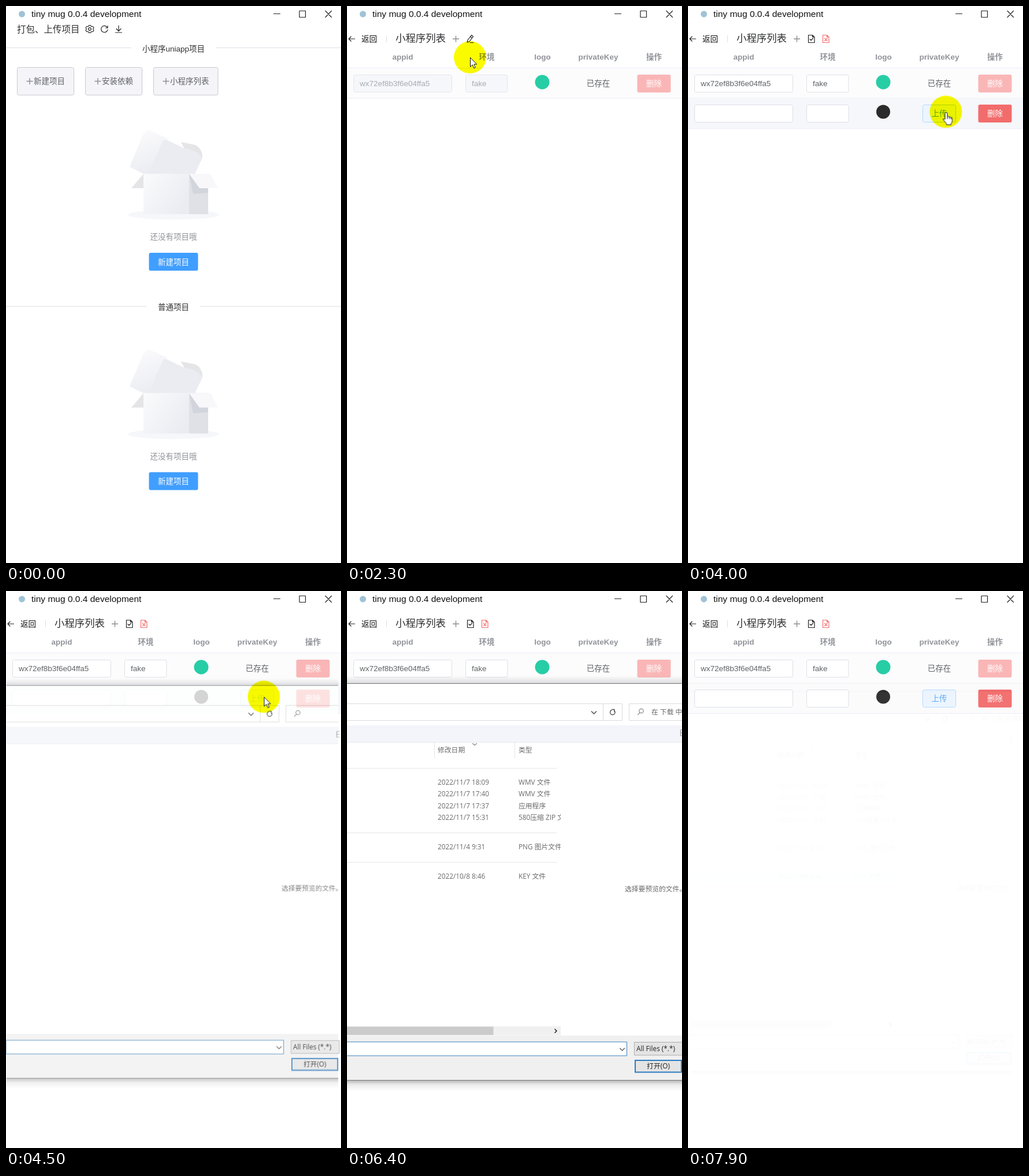
These frames come from a looping animation (580x966 px, 8 s). An HTML page:

```html
<!DOCTYPE html>
<html lang="zh-CN">
<head>
<meta charset="utf-8">
<title>Project list</title>
<style>
html, body { margin: 0; width: 100%; height: 100%; overflow: hidden; background: #fff; }
svg { display: block; width: 580px; height: 966px; }
text { font: 13.5px "Liberation Sans", "Noto Sans CJK SC", "Noto Sans CJK", sans-serif; fill: #303133; white-space: pre; }
.mid { text-anchor: middle; }
.end { text-anchor: end; }
.white { fill: #fff; }
.soft { fill: #909399; }
.body { fill: #606266; }
.head text { font-weight: bold; fill: #909399; text-anchor: middle; }
.line { stroke: #dcdfe6; fill: none; }
.icon { fill: none; stroke: #222; stroke-width: 1.2; stroke-linecap: round; stroke-linejoin: round; }
.plain { fill: #f4f4f9; stroke: #c8cad0; }
.field { fill: #fff; stroke: #dcdfe6; }
.off .field { fill: #f5f7fa; stroke: #e4e7ed; }
.off text { fill: #a8abb2; }
#dialog text { font: 11.8px "Open Sans", "Noto Sans CJK SC", "Noto Sans CJK", sans-serif; fill: #6a6a6a; }
#dialog text.dark { fill: #222; }
.grid { stroke: #e6e6e6; fill: none; }

.anim, .move { animation: 8s step-end infinite; }
#home { animation-name: home; }
#list { animation-name: list; }
#press { animation-name: press; }
#view { animation-name: view; }
#edit { animation-name: edit; }
#hover1 { animation-name: hover1; }
#hover2 { animation-name: hover2; }
#dialog { animation-name: dialog; transform-origin: 100px 490px; }
#files { animation-name: files; }
#loads { animation-name: loads; }
#pick { animation-name: pick; }
#arrow { animation-name: arrow; }
#hand { animation-name: hand; }
#ring { animation-name: ring; }
.move { animation-name: move; }
#spot { fill: #fbfb00; mix-blend-mode: multiply; }

@keyframes home { 0% { opacity: 1 } 16.25%, 100% { opacity: 0 } }
@keyframes list { 0% { opacity: 0 } 16.25%, 100% { opacity: 1 } }
@keyframes press { 0% { opacity: 0 } 12.5% { opacity: 1 } 16.25%, 100% { opacity: 0 } }
@keyframes view { 0% { opacity: 1 } 33.75%, 100% { opacity: 0 } }
@keyframes edit { 0% { opacity: 0 } 33.75%, 100% { opacity: 1 } }
@keyframes hover1 { 0% { opacity: 0 } 41.25% { opacity: 1 } 46.25%, 100% { opacity: 0 } }
@keyframes hover2 { 0% { opacity: 0 } 46.25% { opacity: 1 } 57.5%, 100% { opacity: 0 } }
@keyframes dialog {
  0% { opacity: 0; transform: scale(.94) }
  55% { opacity: .35; transform: scale(.96) }
  56.25% { opacity: .8; transform: scale(.99) }
  57.5% { opacity: 1; transform: none }
  96.25% { opacity: .6; transform: scale(.985) }
  97.5% { opacity: .2; transform: scale(.97) }
  98.75% { opacity: .04; transform: scale(.958) }
  100% { opacity: 0; transform: scale(.94) }
}
@keyframes files { 0% { opacity: 0 } 57.5% { opacity: 1 } 78.75%, 100% { opacity: 0 } }
@keyframes loads { 0% { opacity: 0 } 78.75%, 100% { opacity: 1 } }
@keyframes pick {
  0% { opacity: 0; transform: none }
  87.5% { opacity: 1; transform: translateY(-51px) }
  88.75% { opacity: 1; transform: none }
  91.25%, 100% { opacity: 1; transform: translateY(51px) }
}
@keyframes hand {
  0% { opacity: 0 } 11.25% { opacity: 1 } 16.25% { opacity: 0 }
  32.5% { opacity: 1 } 37.5% { opacity: 0 } 47.5% { opacity: 1 } 56.25%, 100% { opacity: 0 }
}
@keyframes arrow {
  0% { opacity: 1 } 11.25% { opacity: 0 } 16.25% { opacity: 1 }
  32.5% { opacity: 0 } 37.5% { opacity: 1 } 47.5% { opacity: 0 } 56.25%, 100% { opacity: 1 }
}
@keyframes ring {
  0% { opacity: 0 } 13.75% { opacity: 1 } 16.25% { opacity: 0 }
  32.5% { opacity: 1 } 35% { opacity: 0 } 52.5% { opacity: 1 } 55%, 100% { opacity: 0 }
}
@keyframes move {
  0% { transform: translate(-80px, -80px) }
  1.25% { transform: translate(361px, 327px); animation-timing-function: steps(5) }
  7.5% { transform: translate(318px, 165px); animation-timing-function: steps(3) }
  11.25% { transform: translate(335px, 143px) }
  21.25% { transform: translate(335px, 143px); animation-timing-function: steps(6) }
  28.75% { transform: translate(213px, 89px); animation-timing-function: steps(3) }
  32.5% { transform: translate(187px, 59px) }
  36.25% { transform: translate(187px, 59px); animation-timing-function: steps(10) }
  48.75% { transform: translate(446.5px, 183.5px) }
  65% { transform: translate(213.5px, 232px); animation-timing-function: steps(4) }
  70%, 100% { transform: translate(-60px, 545px) }
}
</style>
</head>
<body>
<svg viewBox="0 0 580 966">
  <defs>
    <linearGradient id="front" x2="1" y2=".6"><stop stop-color="#fbfbfd"/><stop offset="1" stop-color="#eaecf1"/></linearGradient>
    <linearGradient id="lid" x1=".2" y1="0" x2=".5" y2="1"><stop stop-color="#fbfbfd"/><stop offset="1" stop-color="#ebecf2"/></linearGradient>
    <linearGradient id="shade" x2="0" y2="1"><stop stop-color="#000" stop-opacity=".3"/><stop offset=".4" stop-color="#000" stop-opacity=".08"/><stop offset="1" stop-color="#000" stop-opacity="0"/></linearGradient>
    <linearGradient id="glow" x2="0" y2="1"><stop stop-color="#000" stop-opacity="0"/><stop offset="1" stop-color="#000" stop-opacity=".13"/></linearGradient>
    <clipPath id="pane"><path d="M0 263H370V755H0z"/></clipPath>
    <path id="plus" d="M-5.5 0H5.5M0-5.5V5.5" fill="none" stroke="#8c8e93" stroke-width="1.4"/>
    <path id="page" class="icon" style="stroke:inherit" d="M-5-6.5H2L5.5-3V6.5H-5zM2-6.5V-3H5.5"/>
    <g id="empty">
      <ellipse cx="290" cy="362" rx="79" ry="8.5" fill="#f6f7fa"/>
      <path d="M214 279L237 224Q241 215 250 216L280 230 262 291H238z" fill="url(#lid)"/>
      <path d="M247 291L270 237Q273 230 281 231L330 243Q342 253 340 264L327 291z" fill="#ebecf2"/>
      <path d="M272 231L300 230 309 247 278 232z" fill="#fff"/>
      <path d="M303 236L328 241Q338 246 340 259L338 262Q335 252 309 247z" fill="#e5e5e7"/>
      <path d="M238 291L217 316H238z" fill="#e5e5e7"/>
      <path d="M238 291H317V361H238z" fill="url(#front)"/>
      <path d="M317 291H350V361H317z" fill="#dfe1e7"/>
      <path d="M317 291L350 316V324L324 326z" fill="#d2d5dc"/>
      <path d="M317 291H354L367 316H335z" fill="#f8f8fb"/>
      <text class="mid soft" x="290" y="405">还没有项目哦</text>
      <rect x="247.5" y="428" width="85" height="31" rx="3" fill="#409eff"/>
      <text class="mid white" x="290" y="448.5">新建项目</text>
    </g>
  </defs>

  <path fill="#fff" d="M0 0H580V966H0z"/>
  <circle cx="27.5" cy="14" r="5.5" fill="#9fc3d6"/>
  <text x="44" y="19" style="font-size:15.5px;fill:#111">tiny mug 0.0.4 development</text>
  <path class="icon" d="M463.5 13.5H474.5M508 8.5H518.5V19.5H508zM553 8.5L563.5 19.5M563.5 8.5L553 19.5"/>

  <g id="home" class="anim">
    <text x="19" y="45.5" style="font-size:15.5px">打包、上传项目</text>
    <g class="icon">
      <path d="M143.5 33.5H146.5L147.5 35.5 150.5 35.5 152 38 150.5 40 152 42 150.5 44.5H147.5L146.5 46.5H143.5L142.5 44.5H139.5L138 42 139.5 40 138 38 139.5 35.5H142.5z"/>
      <circle cx="145" cy="40" r="2.3"/>
      <path d="M175.5 37.5A5.7 5.7 0 1 0 176 41M176 34.5V38H172.5"/>
      <path d="M195 34V43M191 39.5L195 43.5 199 39.5M189.5 46H200.5"/>
    </g>
    <path class="line" d="M0 72.5H217M363 72.5H580M0 521H244M336 521H580"/>
    <text class="mid" x="290" y="79">小程序uniapp项目</text>
    <text class="mid" x="290" y="527">普通项目</text>
    <g class="plain">
      <rect x="19.5" y="106.5" width="98" height="48" rx="3"/>
      <rect x="137.5" y="106.5" width="98" height="48" rx="3"/>
      <rect x="255.5" y="106.5" width="111.5" height="48" rx="3"/>
    </g>
    <rect id="press" class="anim" x="255.5" y="106.5" width="111.5" height="48" rx="3" fill="#ededf1" stroke="#c8cad0"/>
    <use href="#plus" x="41" y="130.5"/><text class="body" x="48" y="135">新建项目</text>
    <use href="#plus" x="159" y="130.5"/><text class="body" x="166" y="135">安装依赖</text>
    <use href="#plus" x="277" y="130.5"/><text class="body" x="284" y="135">小程序列表</text>
    <use href="#empty"/>
    <use href="#empty" y="380.5"/>
  </g>

  <g id="list" class="anim">
    <path class="icon" d="M13.5 57H3M7 53L3 57 7 61"/>
    <text x="25" y="62" style="fill:#111">返回</text>
    <path class="line" d="M68.5 51V63"/>
    <text x="84" y="62" style="font-size:17.4px">小程序列表</text>
    <use href="#plus" x="188.5" y="57"/>
    <g class="head">
      <text x="96.5" y="93">appid</text><text x="242" y="93">环境</text><text x="338.5" y="93">logo</text>
      <text x="435" y="93">privateKey</text><text x="531.5" y="93">操作</text>
    </g>
    <path fill="#fcfcfd" d="M0 108H580V160H0z"/>
    <path id="hover1" class="anim" fill="#f5f7fa" d="M0 108H580V160H0z"/>
    <path stroke="#ebeef5" d="M0 107.5H580M0 160H580"/>
    <circle cx="338" cy="132" r="12.5" fill="#27cda5"/>
    <text class="mid body" x="435" y="138.5">已存在</text>
    <rect x="502.5" y="119" width="58" height="31" rx="3" fill="#fab6b6"/>
    <text class="mid white" x="531.5" y="139">删除</text>

    <g id="view" class="anim off">
      <path class="icon" d="M209 59L215.5 50.5 218.5 53 212 61.5 208 63zM213.5 53L216.5 55.5M213 63.5H219"/>
      <g class="row"></g>
    </g>
    <g id="edit" class="anim">
      <g stroke="#222"><use href="#page" x="213.5" y="57"/><path class="icon" d="M211 57.5L213 59.5 216.5 56"/></g>
      <g stroke="#f56c6c"><use href="#page" x="238.5" y="57"/><path class="icon" style="stroke:inherit" d="M236.5 56L241 60.5M241 56L236.5 60.5"/></g>
      <g class="row"></g>
      <path fill="#fbfbfc" d="M0 160.5H580V212H0z"/>
      <path id="hover2" class="anim" fill="#f5f7fa" d="M0 160.5H580V212H0z"/>
      <path stroke="#ebeef5" d="M0 212.5H580"/>
      <rect class="field" x="11.5" y="171.5" width="170" height="30" rx="3"/>
      <rect class="field" x="205.5" y="171.5" width="72.5" height="30" rx="3"/>
      <circle cx="338" cy="183.5" r="12" fill="#2b2b2b"/>
      <rect x="406.5" y="171.5" width="57" height="30" rx="3" fill="#ecf5ff" stroke="#b3d8ff"/>
      <text class="mid" x="435" y="191" style="fill:#5aa6ee">上传</text>
      <rect x="502.5" y="171" width="58" height="31" rx="3" fill="#f26c6c"/>
      <text class="mid white" x="531.5" y="191">删除</text>
    </g>
  </g>

  <g id="dialog" class="anim">
    <path fill="url(#glow)" d="M0 147H580V161H0z"/>
    <path fill="url(#shade)" d="M0 848H580V868H0z"/>
    <path fill="#fff" d="M0 161H580V848H0z"/>
    <path fill="#f3f5fa" d="M0 233H580V262H0z"/>
    <path fill="#f0f0f0" d="M0 771H580V848H0z"/>
    <path stroke="#777" d="M0 160.5H580M0 848.5H580"/>
    <path fill="none" stroke="#dadada" d="M0 195.5H476.5V224.5H0M443.5 196V224M580 195.5H488.5V224.5H580"/>
    <path stroke="#e8eaef" d="M0 262.5H580"/>
    <path fill="#fff" stroke="#3c82bd" d="M-1 782H484.5V806H-1z"/>
    <path fill="#e4e4e4" stroke="#adadad" d="M497.5 782.5H582V805H497.5z"/>
    <path fill="#e4e4e4" stroke="#2b7cc0" stroke-width="2" d="M499 814H579V834.5H499z"/>
    <g class="icon" style="stroke:#555">
      <path style="stroke-width:1.7" d="M423.5 209L427.5 213 431.5 209"/>
      <path d="M472.500 793L476.500 797 480.500 793"/>
      <path style="stroke-width:1.4" d="M462.5 207A4.300 4.300 0 1 1 458 206.500M459 205.500H463V209.500"/>
      <circle cx="509.5" cy="208" r="3.7" style="stroke:#888"/><path d="M507 211L503.5 214.5" style="stroke:#888"/>
      <path d="M582 241H577.5V251H582M578 246H582" style="stroke:#999"/>
    </g>
    <text x="481" y="520.5">选择要预览的文件。</text>
    <text class="dark" x="501" y="798">All Files (*.*)</text>
    <text class="mid dark" x="539" y="828">打开(O)</text>

    <g id="files" class="anim">
      <text class="dark" x="0" y="214">scrm-wechat-vue3</text>
      <path class="icon" d="M111 207.5L113.5 210 111 212.5"/>
      <text x="527" y="214">在 fe-scrm-wechat-vue3 中搜索</text>
      <path class="grid" d="M104 263V290M220 263V290M297.5 263V290"/>
      <text x="-6" y="280">日期</text><text x="110" y="280">类型</text><text x="226" y="280">大小</text>
    </g>
    <g id="loads" class="anim">
      <text x="527" y="214">在 下载 中搜索</text>
      <path class="icon" style="stroke:#888" d="M217.5 264.5L221 267.5 224.5 264.5"/>
      <path class="grid" d="M151.5 263V290M290.5 263V290M0 307.5H363M0 419.5H363M0 470.5H363"/>
      <text x="157" y="280">修改日期</text><text x="297" y="280">类型</text>
      <path id="pick" class="anim" fill="#e5f2fd" d="M0 433H370V455H0z"/>
      <g id="recent" clip-path="url(#pane)"></g>
      <path fill="#f0f0f0" d="M0 755H370V770.5H0z"/>
      <path fill="#cbcbcb" d="M0 755.5H253.5V770H0z"/>
      <path class="icon" style="stroke-width:1.6" d="M360 760L363 763 360 766"/>
    </g>
  </g>

  <circle id="spot" class="move" r="28"/>
  <g class="move">
    <circle id="ring" class="anim" r="5.8" fill="none" stroke="#c22a12" stroke-width="3.6"/>
    <path id="arrow" class="anim" d="M.5 .5V16.5L4.2 13 6.8 19 9.3 17.9 6.8 12.1H11.7z" fill="#fff" stroke="#111"/>
    <path id="hand" class="anim" d="M-1.5 2Q.5 0 2.5 2V8.5Q4.500 7 6 9 8 8 9 10 11.500 9.500 11 12.500V16.500Q10.500 19 9 20.500V22.500H1V20.500Q-2.500 16.500-5 13-5 10.500-1.500 13zM2.500 8.500V12.500M6 9V12.500M9 10V13" fill="#fff" stroke="#111"/>
  </g>
</svg>
<script>
const $ = s => document.querySelector(s);
const text = (x, y, s, cls = "") => `<text x="${x}" y="${y}" class="${cls}">${s}</text>`;

const inputs = `
  <rect class="field" x="11.5" y="119.5" width="170" height="30" rx="3"/>
  <rect class="field" x="205.5" y="119.5" width="72.5" height="30" rx="3"/>`
  + text(22, 139, "wx72ef8b3f6e04ffa5", "body") + text(216, 139, "fake", "body");
document.querySelectorAll(".row").forEach(g => g.innerHTML = inputs);

const dir = "文件夹", json = "JSON 源文件", js = "JavaScript 源文件";
const files = [
  ["11/7 14:52", dir], ["6/8 16:01", dir], ["10/25 18:14", dir], ["1/28 16:16", dir],
  ["10/17 18:17", dir], ["11/7 14:09", dir], ["11/7 18:00", json, 2],
  ["10/17 11:51", "Git Ignore 源文件", 1], ["1/25 20:28", js, 1], ["11/7 18:00", "TS 文件", 5],
  ["1/25 20:28", "Velnor HTML D...", 1], ["9/9 17:42", json, 1], ["11/1 18:17", json, 3],
  ["11/1 18:17", json, 196], ["1/25 20:28", js, 1], ["10/25 18:14", "MD 文件", 5],
  ["10/25 18:14", js, 3], ["11/1 18:17", "LOCK 文件", 145]
];
$("#files").innerHTML += files.map(([date, type, kb], i) => {
  const y = 309 + i * 20.28;
  return text(-1, y, "/" + date) + text(110, y, type) + (kb ? text(290, y, kb + " KB", "end") : "");
}).join("");

const recent = [
  [336, "11/7 18:09", "WMV 文件"], [356, "11/7 17:40", "WMV 文件"], [376.5, "11/7 17:37", "应用程序"],
  [397, "11/7 15:31", "580压缩 ZIP 文件"], [448, "11/4 9:31", "PNG 图片文件"], [499, "10/8 8:46", "KEY 文件"]
];
$("#recent").innerHTML = recent.map(([y, date, type]) =>
  text(157, y, "2022/" + date) + text(297, y, type)).join("");
</script>
</body>
</html>
```
